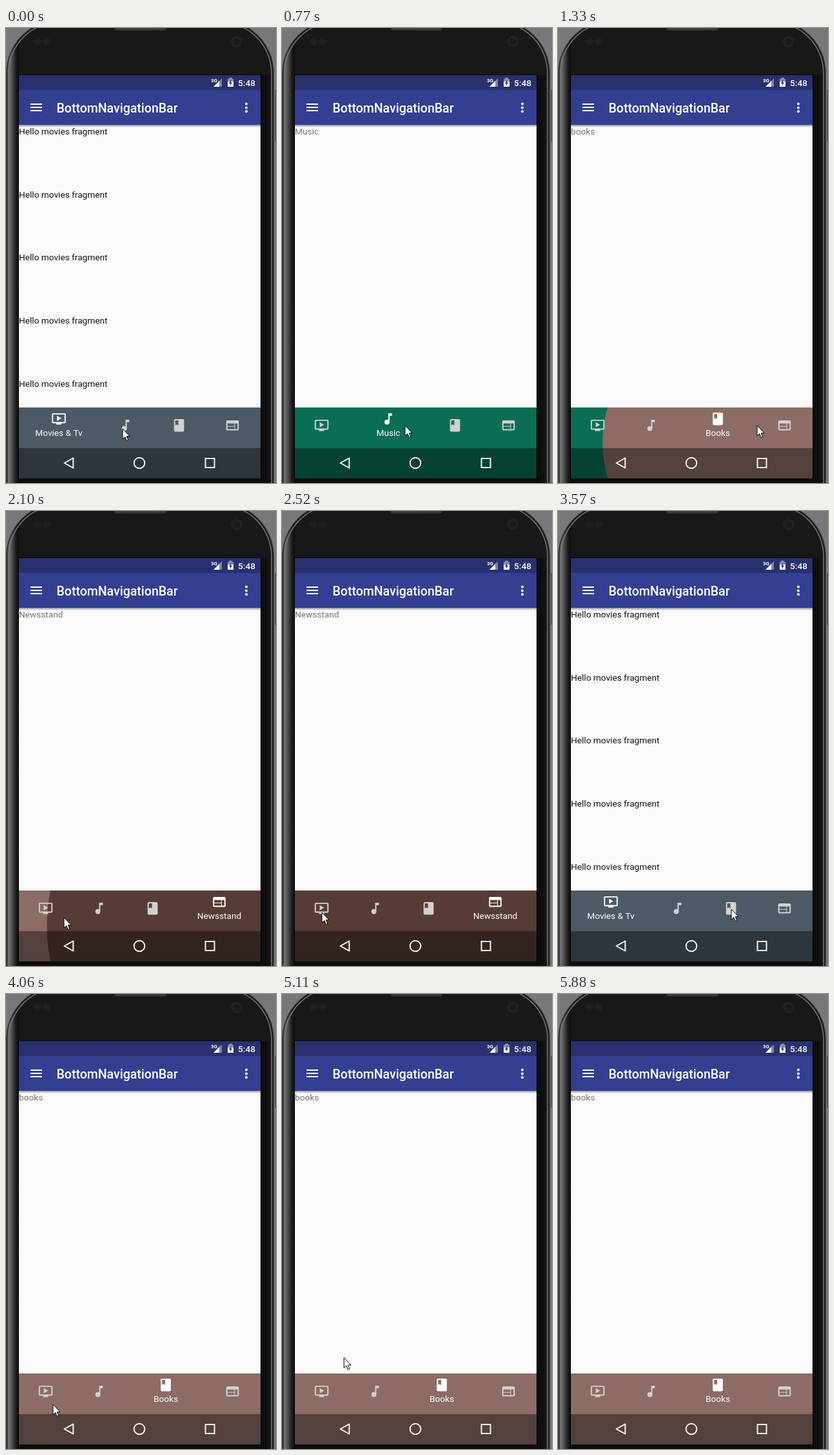
Recreate the animation shown at these times as an HTML page with a canvas. Size 419 by 705 pixels, loop 6.72 s.

```html
<!DOCTYPE html>
<html lang="en">
<head>
<meta charset="utf-8">
<title>Bottom navigation demo</title>
<style>
html, body { margin: 0; width: 100%; height: 100%; overflow: hidden; background: #77787a; }
canvas { display: block; width: 419px; height: 705px; }
</style>
</head>
<body>
<canvas id="stage" width="419" height="705"></canvas>
<script>
const g = document.getElementById('stage').getContext('2d');
const LOOP = 6720, STEP = 70;
const DP = 375 / 384;
const LEFT = 20, TOP = 73, WIDTH = 375, BAR = 588, NAV = 651, BOTTOM = 698;
const SLOT = 83, WIDE = 124;

const lerp = (a, b, p) => a + (b - a) * p;
const clamp = p => Math.min(1, Math.max(0, p));
const ease = p => 0.5 - 0.5 * Math.cos(Math.PI * clamp(p));

// Icons live on a 24 unit grid and fill with the even-odd rule.
function icon(build) {
  const path = new Path2D();
  build(path);
  return path;
}

const video = icon(p => {
  p.roundRect(1, 3, 22, 16, 2);
  p.rect(3, 5, 18, 12);
  p.rect(8, 19, 8, 2);
  p.moveTo(9, 7);
  p.lineTo(16, 11);
  p.lineTo(9, 15);
});

const note = icon(p => {
  p.arc(10, 17, 4, 0, Math.PI * 5 / 3);
  p.lineTo(12, 3);
  p.lineTo(18, 3);
  p.lineTo(18, 7);
  p.lineTo(14, 7);
});

const book = icon(p => {
  p.roundRect(4, 2, 16, 20, 2);
  p.moveTo(6, 4);
  p.lineTo(11, 4);
  p.lineTo(11, 12);
  p.lineTo(8.5, 10.5);
  p.lineTo(6, 12);
});

const page = icon(p => {
  p.roundRect(2, 4, 20, 16, 2);
  p.rect(4, 9, 11, 4);
  p.rect(4, 14, 11, 4);
  p.rect(16, 9, 4, 9);
});

const tabs = [
  { label: 'Movies & Tv', color: '#4b5a66', icon: video },
  { label: 'Music', text: 'Music', color: '#0a6e55', icon: note },
  { label: 'Books', text: 'books', color: '#8c6c65', icon: book },
  { label: 'Newsstand', text: 'Newsstand', color: '#573c36', icon: page }
];

const taps = [
  { at: -1000, tab: 0 }, { at: 395, tab: 1 }, { at: 1174, tab: 2 },
  { at: 1896, tab: 3 }, { at: 2705, tab: 0 }, { at: 3840, tab: 2 }
];

// Pointer glides: start, duration, x, y
const glides = [
  [70, 70, 203, 613], [700, 70, 191, 616], [770, 210, 264, 624],
  [1120, 210, 309, 616], [1330, 350, 350, 620], [1890, 210, 90, 630],
  [2100, 420, 62, 622], [2660, 210, 178, 617], [3290, 280, 269, 617],
  [3780, 280, 73, 636]
];
const SWEEP = 4970, SWEEP_END = 5810;

function pointerAt(t) {
  let x = 181, y = 621;
  for (const [start, time, toX, toY] of glides) {
    const p = clamp((t - start) / time);
    x = lerp(x, toX, p);
    y = lerp(y, toY, p);
  }
  const p = clamp((t - SWEEP) / (SWEEP_END - SWEEP));
  x += 132 * p + 150 * Math.sin(Math.PI * p * p) ** 2;
  y += 10 * p - 297 * Math.sin(Math.PI * p) ** 2;
  return [x, y];
}

function rect(color, x, y, w, h) {
  g.fillStyle = color;
  g.fillRect(x, y, w, h);
}

function disc(color, x, y, r) {
  g.fillStyle = color;
  g.beginPath();
  g.arc(x, y, r, 0, 7);
  g.fill();
}

function poly(color, ...pts) {
  g.fillStyle = color;
  g.beginPath();
  for (let i = 0; i < pts.length; i += 2) g.lineTo(pts[i], pts[i + 1]);
  g.closePath();
  g.fill();
}

function text(str, x, y, size, color, weight = 400, align = 'left') {
  g.font = `${weight} ${size}px Roboto, sans-serif`;
  g.textAlign = align;
  g.fillStyle = color;
  g.fillText(str, x, y);
}

function fade(x0, y0, x1, y1, ...colors) {
  const f = g.createLinearGradient(x0, y0, x1, y1);
  colors.forEach((c, i) => f.addColorStop(i / (colors.length - 1), c));
  return f;
}

function outline(inset) {
  g.beginPath();
  g.roundRect(1 + inset, -12 + inset, 414 - 2 * inset, 900, 82 - inset);
}

function drawPhone() {
  rect('#77787a', 0, 0, 419, 705);
  rect('#555', 417, 96, 2, 80);
  g.save();
  outline(0);
  g.clip();
  rect('#181818', 0, 0, 419, 705);
  rect(fade(0, 0, 20, 0, '#262626', '#6c6c6c', '#484848', '#1e1e1e', '#0b0b0b'), 0, 0, 20, 705);
  rect(fade(395, 0, 415, 0, '#0b0b0b', '#101010', '#1c1c1c'), 395, 73, 20, 632);
  rect('#0c0c0c', LEFT, BOTTOM, WIDTH, 7);
  g.restore();
  g.lineWidth = 1.5;
  outline(0);
  g.strokeStyle = '#2c2c2c';
  g.stroke();
  outline(3);
  g.strokeStyle = '#777';
  g.stroke();
  g.fillStyle = '#333';
  g.beginPath();
  g.roundRect(168, -6, 81, 10, 4);
  g.fill();
  for (let x = 172; x < 247; x += 4) rect('#484848', x, 0, 2, 2);
  disc('#1f1f1f', 49, 21, 6);
  disc('#1f1f1f', 63, 21, 6);
  disc('#222', 358, 21, 9);
  disc('#1a1a1e', 358, 21, 5);
  rect('#050505', LEFT - 1, TOP - 1, WIDTH + 2, BOTTOM - TOP + 2);
}

function drawHeader() {
  rect('#28316e', LEFT, TOP, WIDTH, 23);
  rect('#333f91', LEFT, 96, WIDTH, 54);
  rect(fade(0, 150, 0, 154, 'rgba(0,0,0,.42)', 'rgba(0,0,0,0)'), LEFT, 150, WIDTH, 4);
  text('3G', 318, 84, 8, '#fff', 700);
  poly('rgba(255,255,255,.4)', 335, 78, 335, 91, 322, 91);
  poly('#fff', 331, 82, 331, 91, 322, 91);
  rect('rgba(255,255,255,.45)', 346, 77, 5, 2);
  rect('rgba(255,255,255,.45)', 344, 79, 9, 4);
  rect('#fff', 344, 83, 9, 8);
  poly('#28316e', 349.5, 80, 346, 86, 348, 86, 347.5, 90, 351, 84.5, 349, 84.5);
  text('5:48', 360, 90, 14 * DP, '#fff', 500);
  for (let i = -1; i < 2; i++) {
    rect('#fff', 38, 122 + i * 5, 18, 2);
    disc('#fff', 373, 123.4 + i * 5.9, 2);
  }
  text('BottomNavigationBar', 78.5, 131, 20 * DP, '#fff', 500);
}

function drawContent(tab) {
  rect('#fafafa', LEFT, 150, WIDTH, BAR - 150);
  const size = 14 * DP;
  if (tab.text) return text(tab.text, LEFT, 165, size, '#757575');
  for (let i = 0; i < 5; i++) text('Hello movies fragment', LEFT, 165 + i * 100 * DP, size, '#151515');
}

function drawNavKeys() {
  rect('rgba(0,0,0,.4)', LEFT, NAV, WIDTH, BOTTOM - NAV);
  g.strokeStyle = '#f2f2f2';
  g.lineWidth = 2;
  g.lineJoin = 'round';
  g.beginPath();
  g.moveTo(90.5, 674);
  g.lineTo(104.3, 666.3);
  g.lineTo(104.3, 681.7);
  g.closePath();
  g.stroke();
  g.beginPath();
  g.arc(207, 674, 8.3, 0, 7);
  g.stroke();
  g.lineJoin = 'miter';
  g.strokeRect(309.5, 667, 14, 14);
}

function drawBar(now, last, age) {
  g.save();
  g.beginPath();
  g.rect(LEFT, BAR, WIDTH, BOTTOM - BAR);
  g.clip();
  rect(tabs[last].color, LEFT, BAR, WIDTH, BOTTOM - BAR);
  const rippleX = LEFT + SLOT * (now + 0.5) + (now > last ? WIDE - SLOT : 0);
  disc(tabs[now].color, rippleX, 643, WIDTH * ease(age / 300));
  g.restore();
  drawNavKeys();

  const p = ease(age / 150);
  let x = LEFT;
  tabs.forEach((tab, i) => {
    const on = i === now ? p : i === last ? 1 - p : 0;
    const w = lerp(SLOT, WIDE, on);
    const mid = x + w / 2, shade = lerp(210, 255, on);
    x += w;
    g.save();
    g.translate(mid - 12 * DP, lerp(615.7, 605.7, on) - 12 * DP);
    g.scale(DP, DP);
    g.fillStyle = `rgb(${shade},${shade},${shade})`;
    g.fill(tab.icon, 'evenodd');
    g.restore();
    if (on > 0) text(tab.label, mid, 632.3, 14 * DP, `rgba(255,255,255,${on})`, 400, 'center');
  });
}

function drawPointer(t) {
  if (t > SWEEP_END) return;
  g.save();
  g.translate(...pointerAt(t));
  poly('#fff', 0, 0, 0, 16, 3.7, 12.5, 6.3, 18.5, 8.7, 17.5, 6.2, 11.7, 11, 11.5);
  g.lineWidth = 1;
  g.strokeStyle = '#000';
  g.stroke();
  g.restore();
}

function draw(t) {
  const i = taps.findLastIndex(tap => tap.at <= t);
  const { at, tab } = taps[i];
  const last = i ? taps[i - 1].tab : tab;
  drawPhone();
  drawContent(tabs[tab]);
  drawHeader();
  drawBar(tab, last, t - at);
  drawPointer(t);
}

const begin = performance.now();
function tick() {
  const t = (performance.now() - begin) % LOOP;
  draw(Math.floor(t / STEP) * STEP);
  requestAnimationFrame(tick);
}
tick();
</script>
</body>
</html>
```
